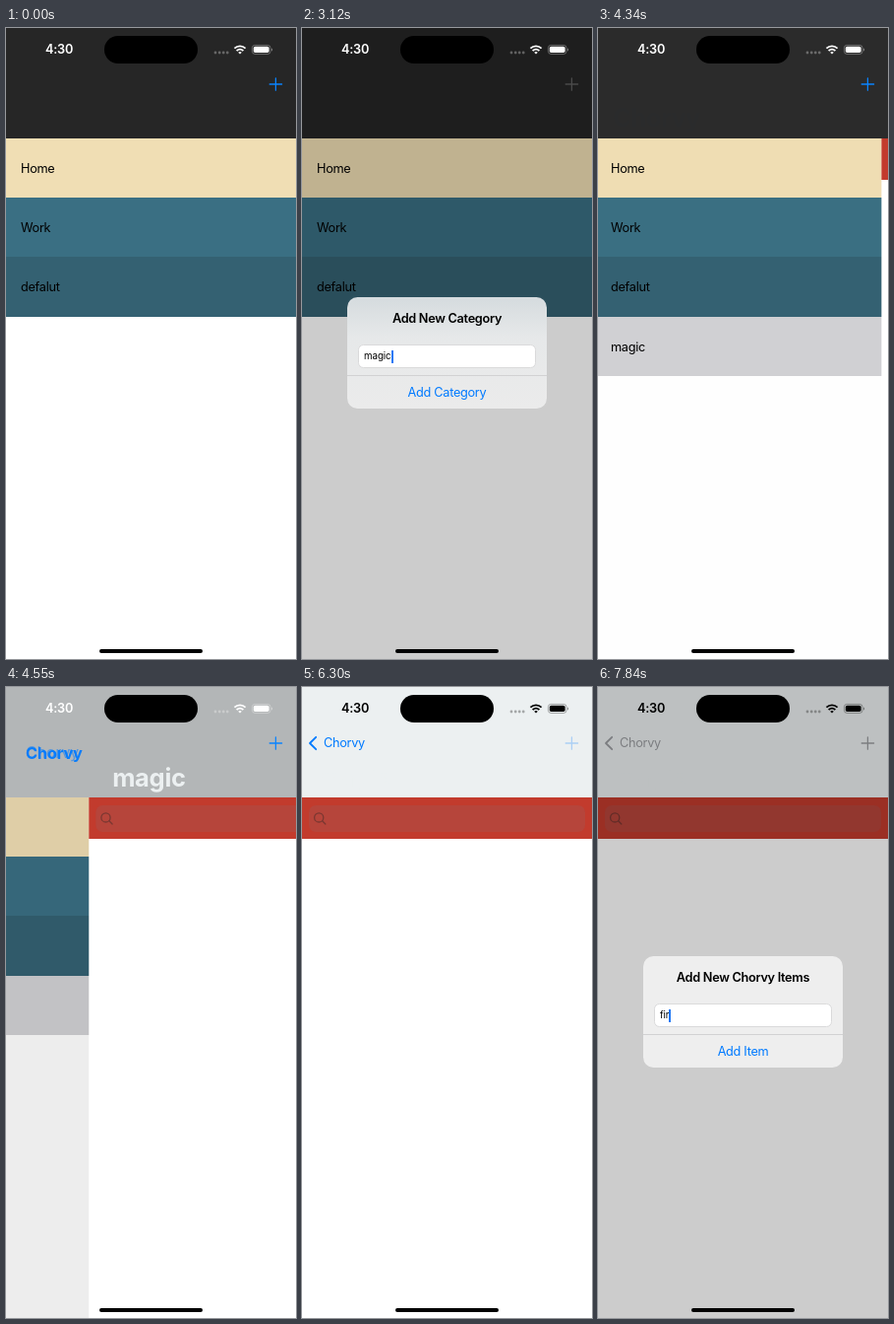
These frames come from a looping animation (295 px wide and 640 px high, 8 s). An HTML page:

```html
<!DOCTYPE html>
<html lang="en">
<head>
<meta charset="utf-8">
<title>To-do app</title>
<style>
@property --push { syntax: '<number>'; inherits: true; initial-value: 0; }
@property --typed { syntax: '<number>'; inherits: true; initial-value: 0; }

:root {
  /* critically damped spring */
  --spring: linear(0, .09 6.25%, .264 12.5%, .442 18.75%, .594 25%, .713 31.25%, .801 37.5%,
    .864 43.75%, .908 50%, .94 56.25%, .96 62.5%, .983 75%, .993 87.5%, 1);
  --blue: #007aff;
}
html, body { margin: 0; width: 100%; height: 100%; overflow: hidden; background: #fff; }
#stage {
  position: relative; width: 295px; height: 640px; overflow: hidden; background: #fff;
  font: 400 12.76px/16px Inter, Roboto, sans-serif; letter-spacing: -.025em; color: #000;
  white-space: nowrap;
  animation: push 8s infinite var(--spring);
}
#stage div, #stage svg { position: absolute; }

/* pages */
.page { left: 0; top: 112px; width: 295px; height: 528px; background: #fff; }
.list { transform: translateX(calc(var(--push) * -30%)); }
.row { left: 0; width: 100%; height: 60.2px; line-height: 61px; text-indent: 15px; }
.row:nth-child(1) { top: 0; background: #f0deb4; }
.row:nth-child(2) { top: 60.2px; background: #3a6f83; }
.row:nth-child(3) { top: 120.4px; background: #346172; }
.row:nth-child(4) { top: 180.6px; background: #d1d1d4; animation: added 8s infinite step-end; }
.shade { inset: 0; background: #000; opacity: calc(var(--push) * .1); }
.detail { transform: translateX(calc((1 - var(--push)) * 100%)); }
.search { left: 0; top: 0; width: 100%; height: 42px; background: #c23b2d; }
.search div { left: 7px; top: 8px; width: 281px; height: 27px; border-radius: 7px; background: rgba(118,118,128,.16); }
.search svg { left: 11px; top: 14px; }

/* navigation bar */
.nav { left: 0; top: 0; width: 295px; height: 112px; background: #262626; overflow: hidden; }
.light { inset: 0; background: #ecf0f1; opacity: var(--push); }
.big { font-size: 25.5px; line-height: 30px; font-weight: 700; }
.title { top: 77px; left: 15px; color: #ecf0f1; transform: translateX(calc((1 - var(--push)) * 326px)); }
.back { left: 22px; top: 57px; color: var(--blue); animation: back 8s infinite var(--spring);
  transform: translate(calc((var(--push) - 1) * 7px), calc((1 - var(--push)) * 35px)); }
.back div { left: 0; transform-origin: 0 50%; }
.back .big { top: -15px; transform: scale(calc(1 - var(--push) * .5));
  opacity: calc(var(--push) * var(--push) * (1 - var(--push)) * 6.5); }
.back .small { top: -8px; transform: scale(calc(2 - var(--push))); opacity: calc(var(--push) * var(--push)); }
.back svg { left: -16px; top: -8px; opacity: calc((var(--push) - .8) * 5); }
.plus { left: 267px; top: 50px; color: var(--blue); animation: plus 8s infinite linear; }

/* alerts */
.dim { inset: 0; background: #000; opacity: 0; animation: dim 8s infinite var(--spring); }
.alert { left: 46px; top: 273px; width: 203px; height: 113px; border-radius: 10.5px; opacity: 0; text-align: center; }
.first { background: linear-gradient(#d5dbde, #e6e8e9 35%, #ebebeb);
  animation: first 8s infinite var(--spring), typeFirst 8s infinite step-end; }
.second { background: #eee; animation: second 8s infinite var(--spring), typeSecond 8s infinite step-end; }
.head { left: 0; right: 0; top: 14px; font-weight: 600; }
.field { left: 11px; top: 48px; width: 179px; height: 21.5px; border: .75px solid #dadadb; border-radius: 5.5px; background: #fff;
  font-size: 9.76px; line-height: 22px; letter-spacing: -.008em; text-align: left; }
.hint, .text { left: 5px; top: 0; height: 22px; }
.hint { color: #c4c4c7; opacity: calc(1 - min(var(--typed), 1)); }
.text { display: flex; align-items: center; }
.text b { font-weight: 400; font-size: calc(clamp(0, var(--typed) - var(--i), 1) * 9.76px); }
.caret { width: 1.5px; height: 13px; background: #1f78f5; }
.first .caret { animation: blinkFirst 8s infinite step-end; }
.second .caret { animation: blinkSecond 8s infinite step-end; }
.act { left: 0; right: 0; bottom: 0; height: 33px; line-height: 33px; border-top: .75px solid #d2d2d3; color: var(--blue); }

/* system chrome */
.status { left: 0; top: 0; width: 295px; height: 44px; color: #fff; animation: status 8s infinite linear; }
.clock { left: 40px; top: 14px; font-weight: 600; letter-spacing: -.02em; }
.status svg { left: 0; top: 0; }
.island { left: 100px; top: 8px; width: 95px; height: 28px; border-radius: 14px; background: #000; }
.home { left: 95px; top: 630px; width: 105px; height: 4px; border-radius: 2px; background: #000; }

@keyframes push { 0%, 54.125% { --push: 0; } 62.94%, 100% { --push: 1; } }
@keyframes added { 0% { visibility: hidden; } 54.25%, 100% { visibility: visible; } }
@keyframes dim {
  0%, 9.625% { opacity: 0; } 17.04%, 39.1% { opacity: .2; }
  44.25%, 81.375% { opacity: 0; } 88.5%, 100% { opacity: .2; }
}
@keyframes first {
  0%, 9.625% { opacity: 0; transform: scale(1.2); }
  17.04%, 39.1% { opacity: 1; transform: none; }
  44.25%, 100% { opacity: 0; transform: none; }
}
@keyframes second {
  0%, 81.375% { opacity: 0; transform: scale(1.2); }
  88.5%, 100% { opacity: 1; transform: none; }
}
@keyframes typeFirst {
  0% { --typed: 0; } 26.5% { --typed: 1; } 27.875% { --typed: 2; }
  29.625% { --typed: 4; } 31.375%, 100% { --typed: 5; }
}
@keyframes typeSecond {
  0% { --typed: 0; } 94.375% { --typed: 1; } 96.5% { --typed: 2; } 98%, 100% { --typed: 3; }
}
@keyframes blinkFirst { 0% { opacity: 1; } 20% { opacity: 0; } 23%, 100% { opacity: 1; } }
@keyframes blinkSecond { 0% { opacity: 1; } 92.875% { opacity: 0; } 94.375%, 100% { opacity: 1; } }
@keyframes plus {
  0%, 6.24% { color: #0a84ff; }
  6.25%, 9.625% { color: #1a507d; }
  12.75% { color: #2e5470; }
  17.04%, 39.1% { color: #5c5c5c; }
  44.25%, 78.74% { color: #0a84ff; }
  78.75%, 81.375% { color: #abcff5; }
  88.5%, 100% { color: #9a9ca0; }
}
@keyframes back { 0%, 81.375% { color: var(--blue); } 88.5%, 100% { color: #9a9ca0; } }
@keyframes status { 0%, 58.4% { color: #fff; } 60%, 100% { color: #000; } }
</style>
</head>
<body>
<div id="stage">
  <div class="page list">
    <div class="row">Home</div>
    <div class="row">Work</div>
    <div class="row">defalut</div>
    <div class="row">magic</div>
    <div class="shade"></div>
  </div>

  <div class="page detail">
    <div class="search">
      <div></div>
      <svg width="14" height="15" fill="none" stroke="#7b3731" stroke-width="1.3" stroke-linecap="round">
        <circle cx="6.2" cy="6.4" r="4.6"/><path d="M9.6 9.8l3.2 3.2"/>
      </svg>
    </div>
  </div>

  <div class="nav">
    <div class="light"></div>
    <div class="title big">magic</div>
    <div class="back">
      <svg width="10" height="16" fill="none" stroke="currentColor" stroke-width="1.8" stroke-linecap="round" stroke-linejoin="round">
        <path d="M8.2 1.8L2 8l6.2 6.2"/>
      </svg>
      <div class="big">Chorvy</div>
      <div class="small">Chorvy</div>
    </div>
    <svg class="plus" width="15" height="15" stroke="currentColor" stroke-width="1.3" stroke-linecap="round">
      <path d="M1.2 7H13.6M7.4 .8V13.2"/>
    </svg>
  </div>

  <div class="dim"></div>

  <div class="alert first">
    <div class="head">Add New Category</div>
    <div class="field">
      <div class="hint">Create New Items</div>
      <div class="text"><b style="--i:0">m</b><b style="--i:1">a</b><b style="--i:2">g</b><b style="--i:3">i</b><b style="--i:4">c</b><span class="caret"></span></div>
    </div>
    <div class="act">Add Category</div>
  </div>

  <div class="alert second">
    <div class="head">Add New Chorvy Items</div>
    <div class="field">
      <div class="hint">Create New Items</div>
      <div class="text"><b style="--i:0">f</b><b style="--i:1">i</b><b style="--i:2">r</b><span class="caret"></span></div>
    </div>
    <div class="act">Add Item</div>
  </div>

  <div class="status">
    <div class="clock">4:30</div>
    <svg width="295" height="44" fill="currentColor">
      <g opacity=".3">
        <circle cx="213" cy="25" r="1.4"/><circle cx="217.2" cy="25" r="1.4"/>
        <circle cx="221.2" cy="25" r="1.4"/><circle cx="225.2" cy="25" r="1.4"/>
      </g>
      <path d="M232.4 20.6A8 8 0 0 1 243.6 20.6M234.6 23.1A5 5 0 0 1 241.4 23.1" fill="none" stroke="currentColor" stroke-width="1.8"/>
      <path d="M236.2 24.8Q238 23.4 239.8 24.8L238 26.6Z"/>
      <rect x="250.4" y="17.4" width="18.6" height="9" rx="2.8" fill="none" stroke="currentColor" stroke-width=".8" opacity=".4"/>
      <rect x="251.8" y="18.8" width="15.8" height="6.2" rx="1.7"/>
      <path d="M270.1 20.4a1.6 1.6 0 0 1 0 3z" opacity=".45"/>
    </svg>
  </div>
  <div class="island"></div>
  <div class="home"></div>
</div>
</body>
</html>
```
